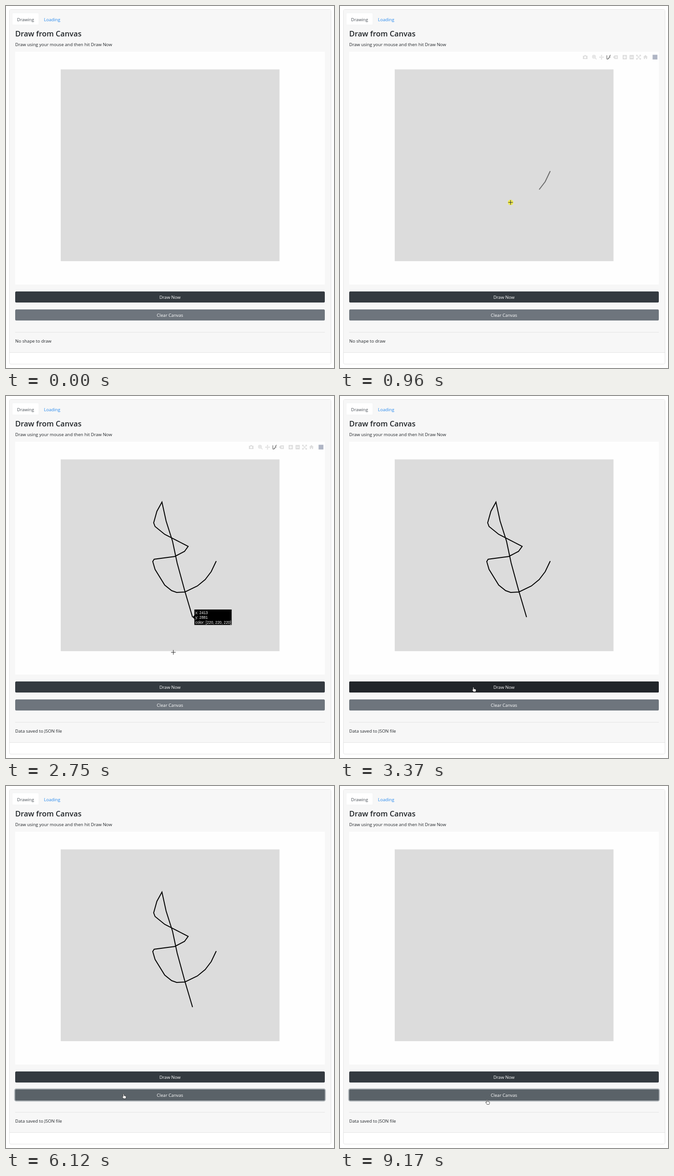
Recreate the animation shown at these times as an HTML page. Size 713 by 785 pixels, loop 9240 ms.

```html
<!DOCTYPE html>
<html lang="en">
<head>
<meta charset="utf-8">
<title>Draw from Canvas</title>
<style>
  html, body { margin: 0; width: 100%; height: 100%; overflow: hidden; background: #fff; }
  svg { display: block; width: 713px; height: 785px; font: 9.55px "Open Sans", sans-serif; fill: #212529; }
  .title { font-size: 16.3px; font-weight: 600; }
  .label { fill: #fff; text-anchor: middle; }
  .tip { font: 8.3px "Liberation Sans", Arial, sans-serif; fill: #fff; }
  .line { fill: none; stroke: #dedede; stroke-width: 1.5; }
  .icons { fill: #dedede; }
  .pointer { fill: #fff; stroke: #222; stroke-width: .8; stroke-linejoin: round; }
</style>
</head>
<body>
<svg viewBox="0 0 713 785">
  <rect x="7.5" y="7.5" width="699" height="769" rx="3" fill="#fff" stroke="#e3e3e3"/>
  <path d="M8 751V10q0-2 2-2H704q2 0 2 2V751Z" fill="#f7f7f7"/>
  <path d="M8 751.5H706M20 707.5H693" stroke="#e3e3e3"/>
  <path d="M13.5 41V17q0-2 2-2H69.500q2 0 2 2V41Z" fill="#fff" stroke="#eef0f1" stroke-width=".7"/>
  <text x="24" y="32.5" fill="#495057">Drawing</text>
  <text x="82.500" y="32.5" fill="#2488ee">Loading</text>
  <text x="20" y="66" class="title">Draw from Canvas</text>
  <text x="20" y="86.500">Draw using your mouse and then hit Draw Now</text>
  <rect x="20" y="99" width="673" height="505" fill="#fefefe"/>
  <rect x="119" y="137.500" width="475.500" height="415.800" fill="#dcdcdc"/>

  <g id="modebar" class="icons">
    <path fill-rule="evenodd" d="M528 108h2.500l1-1.500h3l1 1.500h2.500v7h-10ZM533 109a2.300 2.300 0 1 0 .01 0Z"/>
    <g class="line"><circle cx="552" cy="110" r="3.300"/><path d="M554.500 112.500l3 3M550 110h4M552 108v4"/></g>
    <path d="M568.500 105.500l2 2.500h-1.300v2.300h2.300v-1.300l2.500 2-2.500 2v-1.300h-2.300v2.300h1.300l-2 2.500-2-2.500h1.300v-2.300h-2.300v1.300l-2.500-2 2.500-2v1.300h2.300v-2.300h-1.300Z"/>
    <path class="line" style="stroke:#888" d="M580 107v7q0 2 2.500 1t3-4.500 3-4M582 114l6-4"/>
    <path fill-rule="evenodd" d="M597 107h7v8h-7l-3.500-4ZM598 109l1.500 2-1.500 2 .7.6 1.600-1.900 1.600 1.900.7-.6-1.500-2 1.500-2-.7-.6-1.600 1.900-1.600-1.900Z"/>
    <rect x="614.300" y="106.300" width="9.400" height="9.400" rx="1"/>
    <rect x="629.300" y="106.300" width="9.400" height="9.400" rx="1"/>
    <path d="M616 111h6M619 108v6M631 111h6" stroke="#fff" stroke-width="1.500"/>
    <path class="line" d="M645 107l8 8M653 107l-8 8M644.500 109v-2.500h2.500M651 106.500h2.500v2.500M644.500 113v2.500h2.500M651 115.500h2.500v-2.500" stroke-width="1"/>
    <path d="M664 106l5 5h-1.500v4h-2.500v-3h-2v3h-2.500v-4h-1.500Z"/>
    <rect x="679.500" y="105.700" width="10.500" height="10.300" fill="#b0b6c5"/>
  </g>

  <polyline id="stroke" fill="none"/>
  <g id="tooltip">
    <path d="M0 0L4-4V-16.500H85V17H4V4Z" fill="#000"/>
    <text class="tip" x="6" y="-7">x: <tspan id="tipX"></tspan></text>
    <text class="tip" x="6" y="3.500">y: <tspan id="tipY"></tspan></text>
    <text class="tip" x="6" y="14">color: [220, 220, 220]</text>
  </g>

  <g id="buttons"></g>
  <text id="status" x="20" y="730"></text>

  <g id="cursor">
    <circle id="press" r="6" fill="#f4ef35" opacity=".8"/>
    <path id="cross" d="M-5 0H5M0-5V5" stroke="#222"/>
    <path id="arrow" class="pointer" d="M0 0V10.500L2.400 8.300 4 12l1.700-.7L4.100 7.700H7.500Z"/>
    <path id="hand" class="pointer" d="M-1 1q1-1.500 2 0v3.200q1.200-.6 1.700.3 1.200-.4 1.600.5 1.400-.2 1.400 1.200 0 2.500-1.200 4.300h-4.500q-.7-1.500-2.700-3.700-.5-1 .4-1.400l1.300.9Z"/>
  </g>
</svg>
<script>
const LOOP = 9240;
const $ = id => document.getElementById(id);
const show = (id, on) => $(id).setAttribute('visibility', on ? 'visible' : 'hidden');
const clamp = (v, lo, hi) => Math.min(hi, Math.max(lo, v));
const within = (t, a, b) => t >= a && t < b;
const fade = (t, start) => clamp((t - start) / 150, 0, 1);

// Freehand stroke, one point per mouse sample
const points = [
  [457, 358], [446, 381], [433, 398], [416, 412], [389, 425], [371, 426],
  [360, 422], [345, 410], [324, 376], [319, 359], [322, 354], [367, 348],
  [388, 337], [396, 326], [345, 300], [324, 283], [321, 275], [328, 250],
  [339, 230], [348, 271], [362, 315], [372, 362], [389, 424], [405.5, 479.5]
];
const last = points.length - 1;

// Cursor path: time, x, y
const path = [
  [70, 710, 780], [340, 583, 470], [480, 470, 372], [560, 457, 358],
  ...points.map(([x, y], i) => [638 + i * 64.3, x, y]),
  [2560, 405.5, 479.5], [2750, 364, 555.5], [2890, 335, 606], [3100, 300, 628],
  [3370, 290, 631], [3700, 290, 631], [4000, 265, 648], [4260, 253, 661],
  [5500, 254, 661], [5700, 255.5, 667.5], [9030, 255.5, 667.5], [9170, 319.5, 680]
];

function cursorAt(t) {
  const next = path.findIndex(p => p[0] > t);
  if (next === 0) return path[0].slice(1);
  if (next < 0) return path[path.length - 1].slice(1);
  const [a, b] = [path[next - 1], path[next]];
  const k = (t - a[0]) / (b[0] - a[0]);
  return [a[1] + (b[1] - a[1]) * k, a[2] + (b[2] - a[2]) * k];
}

function makeButton(id, y, text, fill, hover, ring) {
  const box = 'x="20" width="673" height="24" rx="2.5"';
  $('buttons').innerHTML += `
    <rect id="${id}Ring" x="19" y="${y - 1}" width="675" height="26" rx="3.5" fill="none" stroke="${ring}" stroke-width="2.4" stroke-opacity=".6"/>
    <rect ${box} y="${y}" fill="${fill}"/>
    <rect id="${id}Hover" ${box} y="${y}" fill="${hover}"/>
    <text class="label" x="356.5" y="${y + 16}">${text}</text>`;
}
makeButton('draw', 619, 'Draw Now', '#343a40', '#212529', '#52585d');
makeButton('clear', 658, 'Clear Canvas', '#6e757d', '#5a6268', '#828a91');

function placeTooltip(x, y) {
  const toData = 8.423;
  $('tooltip').setAttribute('transform', `translate(${x} ${y})`);
  $('tipX').textContent = Math.round((x - 119) * toData);
  $('tipY').textContent = Math.round((y - 137.5) * toData);
}

function render(t) {
  const [x, y] = cursorAt(t);
  const overCanvas = x > 119 && x < 594 && y > 137 && y < 557;
  const overButton = x < 693 && within(y, 619, 643) || within(y, 658, 682);
  const pressed = within(t, 600, 2410) || within(t, 3500, 3700) || within(t, 5400, 5600);

  $('cursor').setAttribute('transform', `translate(${x} ${y})`);
  show('press', t >= 70 && pressed);
  show('cross', t >= 70 && overCanvas);
  show('hand', t >= 70 && overButton);
  show('arrow', t >= 70 && !overCanvas && !overButton);

  // The drawn line trails the cursor by a few samples
  const end = clamp(Math.floor(2.01 + (t - 960) / 56.25), -1, last);
  const saved = t >= 2600;
  $('stroke').setAttribute('points', points.slice(0, end + 1).join(' '));
  $('stroke').setAttribute('stroke', saved ? '#000' : '#6a6a6a');
  $('stroke').setAttribute('stroke-width', 2);
  show('stroke', t < 8500);

  const hovering = t < 600 && overCanvas;
  const stale = within(t, 2600, 2890);
  show('tooltip', hovering || stale);
  if (hovering) placeTooltip(x, y);
  if (stale) placeTooltip(...points[last]);
  show('modebar', within(t, 230, 1030) || stale);

  const blur = 1 - fade(t, 5480);
  $('drawHover').style.opacity = fade(t, 3050) * blur;
  $('drawRing').style.opacity = fade(t, 3560) * blur;
  $('clearHover').style.opacity = fade(t, 4320);
  $('clearRing').style.opacity = fade(t, 5480);
  $('status').textContent = t < 2680 ? 'No shape to draw' : 'Data saved to JSON file';
}

const start = performance.now();
function tick() {
  render((performance.now() - start) % LOOP);
  requestAnimationFrame(tick);
}
tick();
</script>
</body>
</html>
```
